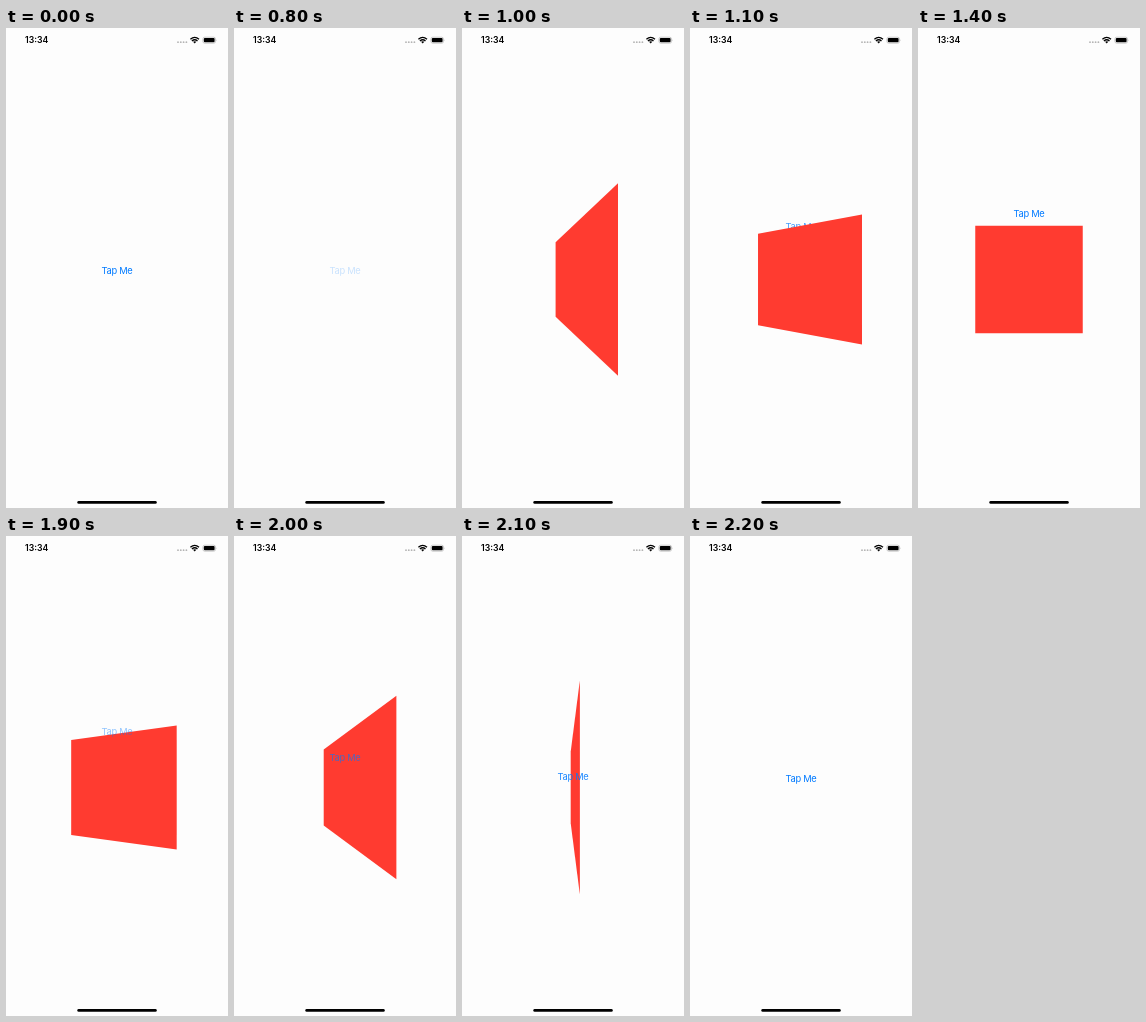
An HTML page for the animation above (2300 ms loop, 222 by 480 pixels).

```html
<!DOCTYPE html>
<html lang="en">
<head>
<meta charset="utf-8">
<title>Pivot transition</title>
<style>
  html, body { margin: 0; height: 100%; overflow: hidden; background: #fdfdfd; }
  svg { display: block; width: 222px; height: 480px; }
  text { font-family: Inter, "Liberation Sans", sans-serif; }
  .clock { font-size: 8.7px; font-weight: 600; }
  #label { font-size: 9.3px; letter-spacing: -.3px; fill: #007aff; text-anchor: middle; }
</style>
</head>
<body>
<svg id="stage" viewBox="0 0 222 480">
  <text class="clock" x="19" y="15.3">13:34</text>
  <g fill="#b4b4b4">
    <circle cx="172" cy="14.2" r=".9"/>
    <circle cx="174.8" cy="14.2" r=".9"/>
    <circle cx="177.6" cy="14.2" r=".9"/>
    <circle cx="180.4" cy="14.2" r=".9"/>
  </g>
  <g fill="none" stroke="#000" stroke-width="1.35">
    <path d="M184.4 11.2Q188.7 7.5 193 11.2"/>
    <path d="M185.9 12.9Q188.7 10.5 191.5 12.9"/>
  </g>
  <path d="M187.1 13.8Q188.7 12.7 190.3 13.8L188.7 15.5Z"/>
  <rect x="196.9" y="9.2" width="12.6" height="6" rx="1.8" fill="none" stroke="#aaa" stroke-width=".6"/>
  <rect x="197.8" y="10.1" width="10.8" height="4.2" rx="1"/>
  <path d="M210.2 11.2q.9 .9 0 2z" fill="#aaa"/>
  <rect x="71.3" y="473" width="79.5" height="2.8" rx="1.4"/>
  <text id="label" x="111" y="246.3">Tap Me</text>
  <polygon id="box" fill="#ff3b30"/>
</svg>
<script>
const stage = document.getElementById('stage');
const label = document.getElementById('label');
const box = document.getElementById('box');

const LOOP = 2300, STEP = 100, DURATION = 350;
const PRESS_IN = 800, OPEN = 865, PRESS_OUT = 1700, CLOSE = 1800;
const CX = 111, CY = 251.5, HALF = 53.75;

const phase = (t, start) => Math.min(1, Math.max(0, (t - start) / DURATION));

// cubic-bezier(.42, 0, .58, 1)
function ease(x) {
  if (x <= 0 || x >= 1) return x;
  let lo = 0, hi = 1, s;
  for (let i = 0; i < 24; i++) {
    s = (lo + hi) / 2;
    const bx = 3 * s * (1 - s) * (.42 * (1 - s) + .58 * s) + s ** 3;
    if (bx < x) lo = s; else hi = s;
  }
  return s * s * (3 - 2 * s);
}

// Square turned about its vertical axis, seen from one side length away
function corners(angle) {
  const project = (x, y) => {
    const scale = HALF / (1 - x * Math.sin(angle) / 2);
    return [CX + x * Math.cos(angle) * scale, CY + y * scale];
  };
  return [project(-1, -1), project(1, -1), project(1, 1), project(-1, 1)];
}

function draw(now) {
  const t = Math.floor(now % LOOP / STEP) * STEP;
  const closing = t >= CLOSE;
  const shown = closing ? 1 - ease(phase(t, CLOSE)) : ease(phase(t, OPEN));

  box.setAttribute('visibility', shown > 0 ? 'visible' : 'hidden');
  box.setAttribute('points', corners((1 - shown) * Math.PI / 2).join(' '));

  const release = t >= PRESS_OUT ? CLOSE : OPEN;
  label.setAttribute('opacity', t < PRESS_IN ? 1 : .2 + .8 * phase(t, release));
  label.setAttribute('y', 246.3 - 57 * shown);

  // The leaving square drops behind the label
  const front = closing ? label : box;
  if (stage.lastElementChild !== front) stage.append(front);
}

const begin = performance.now();
function tick() {
  draw(performance.now() - begin);
  requestAnimationFrame(tick);
}
tick();
</script>
</body>
</html>
```
